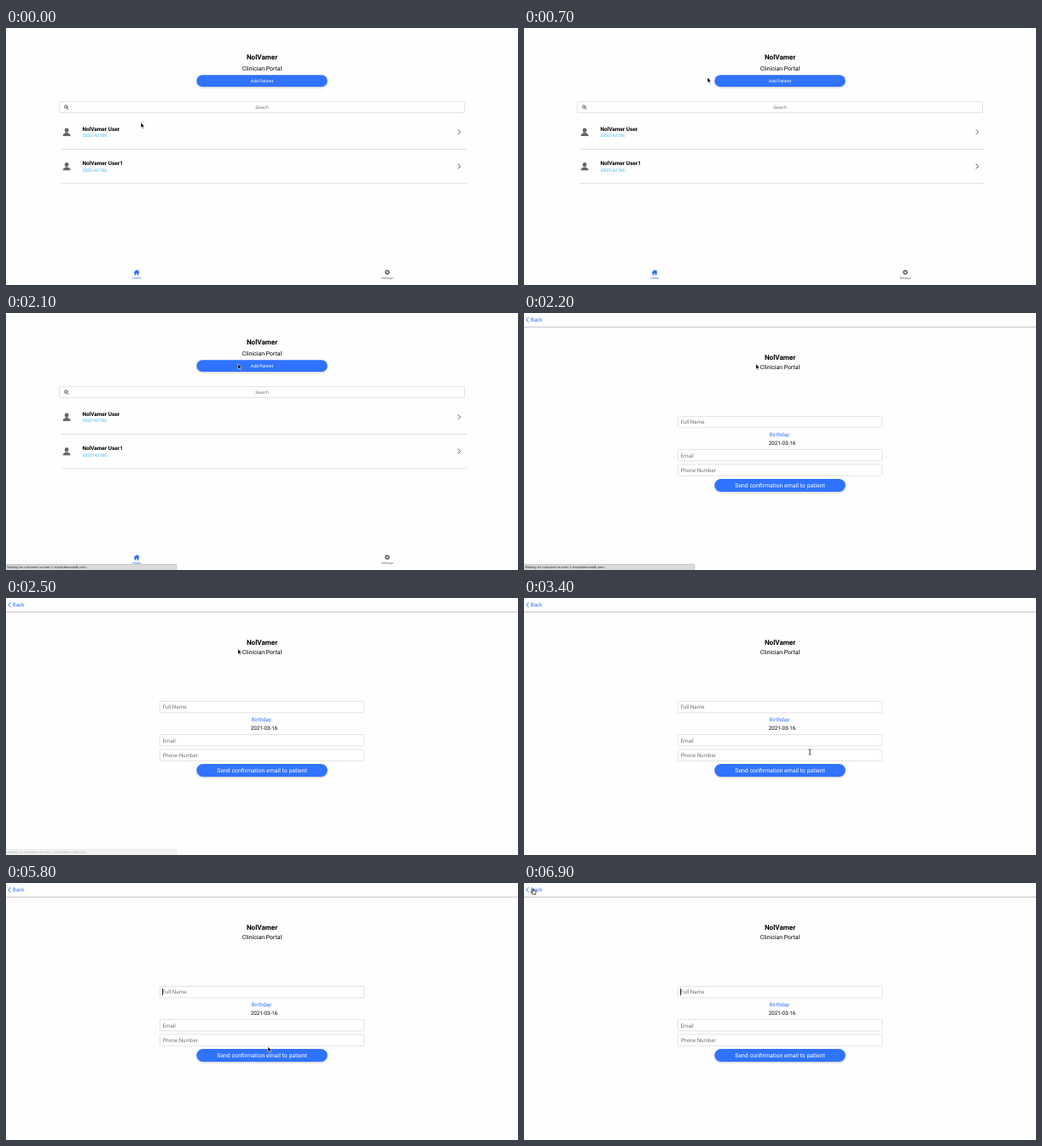
Recreate the animation shown at these times as an HTML page. Size 600x302 px, loop 7 s.

```html
<!DOCTYPE html>
<html lang="en">
<head>
<meta charset="utf-8">
<title>Clinician Portal</title>
<style>
  html, body { margin: 0; width: 100%; height: 100%; overflow: hidden; background: #fefeff; }
  svg { display: block; width: 600px; height: 302px; }
  text { font-family: Roboto, sans-serif; text-rendering: geometricPrecision; }
  .mid { text-anchor: middle; }
  .title { font-size: 8.1px; font-weight: 700; }
  .sub { font-size: 6.9px; }
  .name { font-size: 6.45px; font-weight: 700; }
  .phone { font-size: 5.1px; fill: #46b9ee; }
  .small { font-size: 5.1px; }
  .form { font-size: 6.25px; }
  .tab { font-size: 3.75px; }
  .status { font: 4px "Liberation Sans", Arial, sans-serif; fill: #333; }
  .grey { fill: #757575; }
  .icon { fill: #666; }
  .blue { fill: #2f72f5; }
  .white { fill: #fff; }
  .pill { fill: #3073ff; filter: drop-shadow(0 1px 1.2px rgba(0, 0, 0, .22)); }
  .search { fill: #fff; filter: drop-shadow(0 .7px .7px rgba(0, 0, 0, .42)); }
  .line { stroke: #e6dfdf; }
  .field { fill: #fff; stroke: #dcdcde; stroke-width: .8; }
  .stroke { fill: none; stroke: #555; stroke-width: 1; stroke-linecap: round; stroke-linejoin: round; }
</style>
</head>
<body>
<svg viewBox="0 0 600 302">
  <defs>
    <g id="person" class="icon">
      <ellipse cx="4.5" cy="2.6" rx="2.3" ry="2.6"/>
      <path d="M0 9.4C0 6.8 2 6.1 3.4 5.5h2.2C7 6.1 9 6.8 9 9.4z"/>
    </g>
    <path id="next" class="stroke" d="M0 0l2.5 2.6L0 5.2"/>
  </defs>

  <g id="list">
    <text class="mid title" x="300" y="37">NolVamer</text>
    <text class="mid sub" x="300" y="50.3">Clinician Portal</text>
    <rect class="pill" x="223.3" y="55.2" width="153.4" height="13.8" rx="6.9"/>
    <text class="mid small white" x="300" y="63.9">Add Patient</text>

    <rect class="search" x="62.5" y="86.4" width="475" height="13.2" rx=".8"/>
    <g class="stroke">
      <circle cx="70.2" cy="92.6" r="1.7"/>
      <path d="M71.5 94l1.6 1.6"/>
    </g>
    <text class="mid small grey" x="300" y="95">Search</text>

    <use href="#person" x="66.6" y="117.6"/>
    <text class="name" x="89.4" y="120.9">NolVamer User</text>
    <text class="phone" x="89.4" y="128.4">5550142786</text>
    <use href="#next" x="530" y="119.6"/>
    <path class="line" d="M65 142.5H540"/>

    <use href="#person" x="66.6" y="157.9"/>
    <text class="name" x="89.4" y="161.2">NolVamer User1</text>
    <text class="phone" x="89.4" y="168.7">5550142786</text>
    <use href="#next" x="530" y="159.9"/>
    <path class="line" d="M65 182.7H540"/>

    <path class="blue" d="M149.6 287.2l3.4-3.3 1.6 1.5v-1h1v2l.9.8-.6.5-.4-.3v3h-1.8v-2h-1.4v2h-1.8v-3l-.4.3z"/>
    <text class="mid tab blue" x="153" y="295">Home</text>
    <circle cx="446.8" cy="287" r="1.8" fill="none" stroke="#666" stroke-width="1.5"/>
    <circle cx="446.8" cy="287" r="2.6" fill="none" stroke="#666" stroke-width="1" stroke-dasharray="1.02"/>
    <text class="mid tab icon" x="446.8" y="295">Settings</text>
  </g>

  <g id="form">
    <path d="M0 16.6H600" stroke="#c6c3c6"/>
    <path class="stroke" style="stroke:#2f72f5" d="M5.2 5.4L2.7 8l2.5 2.6"/>
    <text class="form blue" x="7.8" y="10.2">Back</text>
    <text class="mid title" x="300" y="54.5">NolVamer</text>
    <text class="mid sub" x="300" y="66">Clinician Portal</text>

    <rect class="field" x="180.4" y="121.4" width="239.2" height="13.4" rx="1"/>
    <text class="form grey" x="183.4" y="130.4">Full Name</text>
    <text class="mid form blue" x="300" y="144.5">Birthday:</text>
    <text class="mid form" x="302.5" y="155.1">2021-03-16</text>
    <rect class="field" x="180.4" y="160.4" width="239.2" height="13.4" rx="1"/>
    <text class="form grey" x="183.4" y="169.5">Email</text>
    <rect class="field" x="180.4" y="177.9" width="239.2" height="13.4" rx="1"/>
    <text class="form grey" x="183.4" y="187">Phone Number</text>
    <rect class="pill" x="223.3" y="195" width="153.4" height="15" rx="7.5"/>
    <text class="mid sub white" x="300" y="205.2">Send confirmation email to patient</text>
    <rect id="caret" x="183" y="124" width="1" height="8" fill="#333"/>
  </g>

  <g id="status">
    <path d="M-1 295.4H198.6q1.2 0 1.2 1.2V303H-1z" fill="#dadadc" stroke="#b4b4b6" stroke-width=".7"/>
    <text class="status" x="1.2" y="300.1">Waiting for nolvamer.us-east-1.elasticbeanstalk.com...</text>
  </g>

  <g id="cursor">
    <path id="arrow" d="M0 0V6.2L1.4 5l1 2.3 1-.4-1-2.2h2z" stroke="#fff" stroke-width=".5"/>
    <path id="hand" d="M-.8-2.6q.6-.6 1.1 0V-.8l2.2.5q.7.3.6 1L2.6 3.6H-.8L-2.6 1q-.2-.9.7-.6l1.1.8z" fill="#fff" stroke="#111" stroke-width=".8" stroke-linejoin="round"/>
    <path id="beam" d="M-1.4-3.2Q0-3.2 0-2.3 0-3.2 1.4-3.2M0-2.4V2.4M-1.4 3.2Q0 3.2 0 2.3 0 3.2 1.4 3.2" fill="none" stroke="#222" stroke-width=".8"/>
  </g>
</svg>
<script>
  const LOOP = 7000, STEP = 100;
  const $ = id => document.getElementById(id);

  // time, x, y, pointer shape from that time on
  const path = [
    [0, 158, 111, 'arrow'],
    [100, 160, 112, 'arrow'],
    [300, 160, 112, 'arrow'],
    [500, 172, 98, 'arrow'],
    [700, 215, 58, 'arrow'],
    [900, 260, 41, 'arrow'],
    [1000, 273, 52, 'arrow'],
    [1100, 271.5, 60, 'arrow'],
    [1200, 272, 63.4, 'hand'],
    [2000, 272, 63.4, 'hand'],
    [2100, 271.8, 59.8, 'arrow'],
    [2800, 271.8, 59.8, 'arrow'],
    [3000, 290, 88, 'arrow'],
    [3200, 360, 188, 'arrow'],
    [3300, 369, 204, 'hand'],
    [3400, 335, 181, 'beam'],
    [3600, 261.6, 133.8, 'beam'],
    [4900, 261.6, 133.8, 'beam'],
    [5100, 338, 180, 'beam'],
    [5300, 312, 181, 'beam'],
    [5400, 312, 181, 'beam'],
    [5800, 307, 192.3, 'arrow'],
    [6000, 305, 192, 'arrow'],
    [6100, 305, 192, 'arrow'],
    [6300, 265, 162, 'arrow'],
    [6700, 40, 10, 'arrow'],
    [6800, 14, 3, 'arrow'],
    [6900, 11, 9.6, 'hand']
  ];

  const show = (id, on) => $(id).style.display = on ? '' : 'none';

  function statusAlpha(t) {
    if (t < 2000 || t >= 2600) return 0;
    if (t < 2100) return 0.6;
    return t < 2400 ? 1 : t < 2500 ? 0.7 : 0.35;
  }

  function moveCursor(t) {
    const i = path.findLastIndex(p => p[0] <= t);
    const [t0, x0, y0, shape] = path[i];
    const [t1, x1, y1] = path[i + 1] || [LOOP, x0, y0];
    const k = (t - t0) / (t1 - t0);
    $('cursor').setAttribute('transform', `translate(${x0 + (x1 - x0) * k} ${y0 + (y1 - y0) * k})`);
    for (const id of ['arrow', 'hand', 'beam']) show(id, id === shape);
  }

  function draw(now) {
    const t = Math.floor(now % LOOP / STEP) * STEP;
    show('list', t < 2200);
    show('form', t >= 2200);
    show('caret', t >= 3700 && (t - 3700) % 1000 < 500);
    $('status').style.opacity = statusAlpha(t);
    moveCursor(t);
  }

  const start = performance.now();
  function tick() {
    draw(performance.now() - start);
    requestAnimationFrame(tick);
  }
  tick();
</script>
</body>
</html>
```
